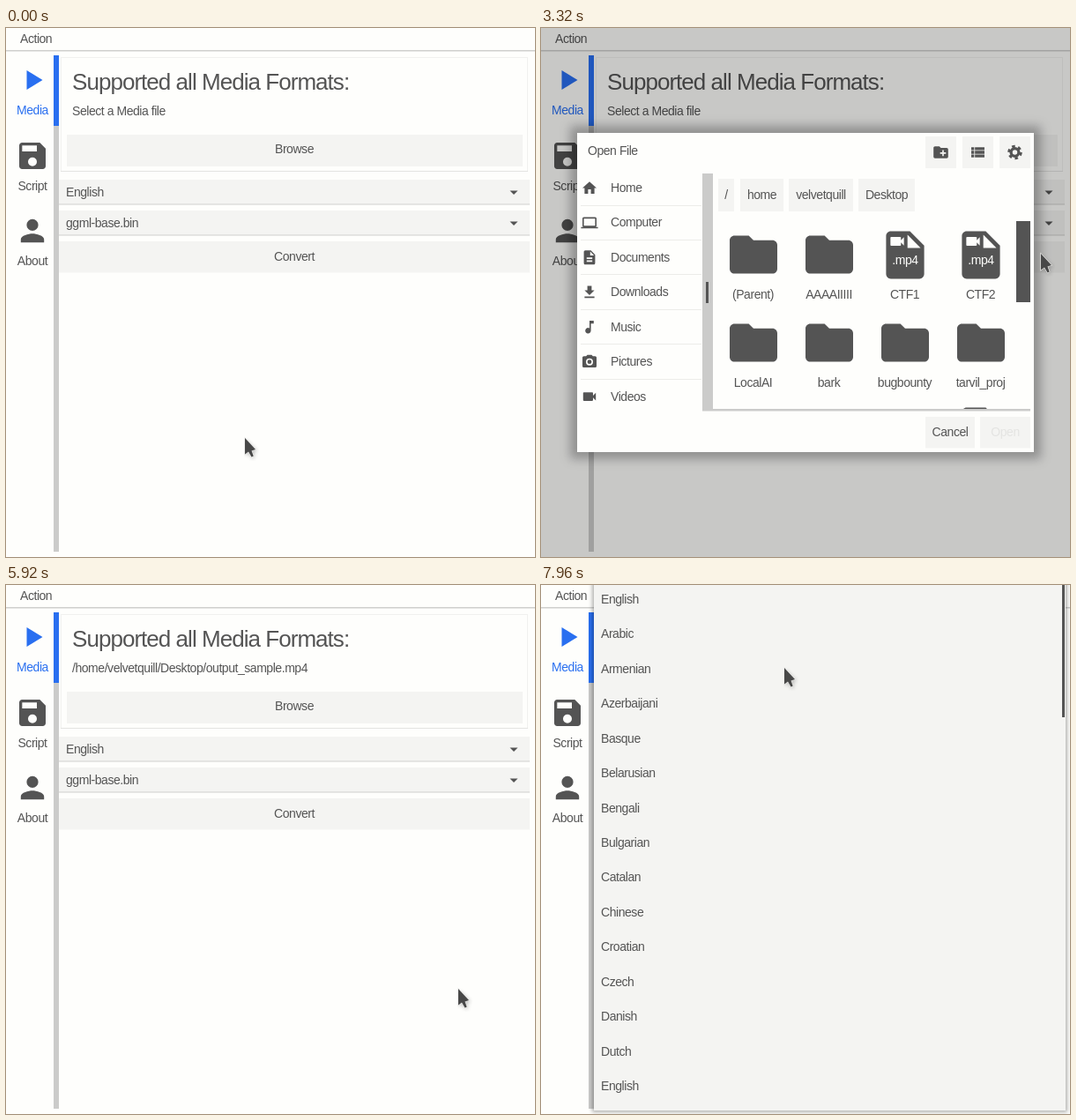
Write an HTML page that moves like this. It is 600 by 600 pixels and loops after 8000 ms.

```html
<!DOCTYPE html>
<html lang="en">
<head>
<meta charset="utf-8">
<title>Media converter</title>
<style>
  :root {
    --page: #fefefc; --control: #f4f4f2; --ink: #545454; --bar: #cbcbca;
    --rule: #cfcfce; --blue: #296ff0; --pick: #c8dbfa;
  }
  html, body { margin: 0; width: 100%; height: 100%; overflow: hidden; background: var(--page); }
  svg { display: block; width: 100vw; height: 100vh; }
  text { font: 14px "Liberation Sans", Arial, sans-serif; letter-spacing: -.45px; fill: var(--ink); white-space: pre; }
  .title { font-size: 26px; letter-spacing: -.96px; }
  .mid { text-anchor: middle; }
  .ink { fill: var(--ink); }
  .control { fill: var(--control); }
  .page, text.page { fill: var(--page); }
  .blue, text.blue { fill: var(--blue); }
  .bar { fill: var(--bar); }
  .rule { fill: var(--rule); }
  .faint, text.faint { fill: #e4e4e2; }
  .pick { fill: var(--pick); }
  .hover { fill: #000; fill-opacity: .05; }
  .ripple { fill: #000; fill-opacity: .09; transform-box: fill-box; transform-origin: center; }

  #cursor, #scroll, #thumb, .ripple { animation: 8s linear infinite; }
  #cursor { animation-name: cursor; animation-timing-function: ease-in-out; }
  #scroll { animation-name: scroll; animation-timing-function: ease-in-out; }
  #thumb { animation-name: thumb; animation-timing-function: ease-in-out; }
  #browseRipple { animation-name: browseRipple; }
  #languageRipple { animation-name: languageRipple; }

  @keyframes cursor {
    0%, 1% { transform: translate(271px, 465px); }
    10.5% { transform: translate(245px, 175px); }
    14%, 27% { transform: translate(237px, 133px); }
    32%, 34.5% { transform: translate(412px, 262px); }
    40.5%, 42% { transform: translate(567px, 256px); }
    45%, 45.5% { transform: translate(548px, 310px); }
    51%, 51.5% { transform: translate(552px, 420px); }
    59%, 61% { transform: translate(444px, 323px); }
    63.5%, 66% { transform: translate(420px, 318px); }
    72%, 75% { transform: translate(513px, 458px); }
    90%, 94.5% { transform: translate(274px, 183px); }
    99%, 100% { transform: translate(276px, 94px); }
  }
  @keyframes scroll {
    0%, 45.5% { transform: none; }
    51%, 100% { transform: translateY(-246px); }
  }
  @keyframes thumb {
    0%, 45.5% { transform: none; }
    51%, 100% { transform: translateY(105px); }
  }
  @keyframes browseRipple {
    0%, 22.5% { transform: scaleX(0); animation-timing-function: ease-out; }
    25%, 26.5% { transform: scaleX(1); }
    26.51%, 100% { transform: scaleX(0); }
  }
  @keyframes languageRipple {
    0%, 92% { transform: scaleX(0); animation-timing-function: ease-out; }
    95.5% { transform: scaleX(1); }
    95.6%, 100% { transform: scaleX(0); }
  }
</style>
</head>
<body>
<svg viewBox="0 0 600 600">
  <defs>
    <path id="folder" d="M10 4H4C2.9 4 2 4.9 2 6v12c0 1.1.9 2 2 2h16c1.1 0 2-.9 2-2V8c0-1.1-.9-2-2-2h-8z"/>
    <path id="camera" d="M17 10.5V7c0-.6-.4-1-1-1H4c-.6 0-1 .4-1 1v10c0 .6.4 1 1 1h12c.6 0 1-.4 1-1v-3.500l4 4v-11z"/>
    <path id="sheet" d="M14 2H6C4.900 2 4 2.900 4 4v16c0 1.100.9 2 2 2h12c1.100 0 2-.9 2-2V8zM13 9V3.500L18.500 9z"/>
    <path id="home" d="M10 20v-6h4v6h5v-8h3L12 3 2 12h3v8z"/>
    <path id="computer" d="M20 18c1.100 0 2-.9 2-2V6c0-1.100-.9-2-2-2H4c-1.100 0-2 .9-2 2v10c0 1.100.9 2 2 2H0v2h24v-2zM4 6h16v10H4z" fill-rule="evenodd"/>
    <path id="document" d="M14 2H6C4.900 2 4 2.900 4 4v16c0 1.100.9 2 2 2h12c1.100 0 2-.9 2-2V8zM16 18H8v-2h8zM16 14H8v-2h8zM13 9V3.500L18.500 9z" fill-rule="evenodd"/>
    <path id="download" d="M19 9h-4V3H9v6H5l7 7zM5 18v2h14v-2z"/>
    <path id="music" d="M12 3v10.600A4 4 0 1 0 14 17V7h4V3z"/>
    <path id="photo" d="M9 2L7.200 4H4C2.900 4 2 4.900 2 6v12c0 1.100.9 2 2 2h16c1.100 0 2-.9 2-2V6c0-1.100-.9-2-2-2h-3.200L15 2zM12 7a5 5 0 1 1 0 10a5 5 0 0 1 0-10zM12 9a3 3 0 1 0 0 6a3 3 0 0 0 0-6z" fill-rule="evenodd"/>
    <path id="newFolder" d="M20 6h-8l-2-2H4C2.900 4 2 4.900 2 6v12c0 1.100.9 2 2 2h16c1.100 0 2-.9 2-2V8c0-1.100-.9-2-2-2zM19 14h-3v3h-2v-3h-3v-2h3V9h2v3h3z" fill-rule="evenodd"/>
    <path id="list" d="M3 5h4v4H3zM3 10h4v4H3zM3 15h4v4H3zM8 5h13v4H8zM8 10h13v4H8zM8 15h13v4H8z"/>
    <g id="gear" fill="none" stroke="#545454">
      <circle cx="12" cy="12" r="5.300" fill="none" stroke-width="4"/>
      <circle cx="12" cy="12" r="8.200" fill="none" stroke-width="3.500" stroke-dasharray="4.300 4.287"/>
    </g>
    <path id="save" d="M17 3H5c-1.100 0-2 .9-2 2v14c0 1.100.9 2 2 2h14c1.100 0 2-.9 2-2V7zM12 19a3 3 0 1 1 0-6a3 3 0 0 1 0 6zM15 9H5V5h10z" fill-rule="evenodd"/>
    <path id="person" d="M12 12a4 4 0 1 0 0-8a4 4 0 0 0 0 8zM12 14c-2.700 0-8 1.300-8 4v2h16v-2c0-2.700-5.300-4-8-4z"/>
    <filter id="blur" x="-20%" y="-20%" width="140%" height="140%"><feGaussianBlur stdDeviation="6"/></filter>
    <filter id="softBlur"><feGaussianBlur stdDeviation="2"/></filter>
    <linearGradient id="fade" x2="0" y2="1">
      <stop stop-opacity=".3"/><stop offset="1" stop-opacity="0"/>
    </linearGradient>
    <clipPath id="view"><path d="M195 219h361v213H195z"/></clipPath>
  </defs>
  <g id="main"></g>
  <g id="dialog"></g>
  <g id="languages"></g>
  <g id="cursor">
    <path d="M1 2V20L5 17 8 23 11 22 9 16 14 15Z" fill="#555" opacity=".4" filter="url(#softBlur)"/>
    <path d="M0 0V18.500L4 15.500 7.500 21.500 9.700 20.500 7.500 14.500 12 13Z" fill="#484848" stroke="#ececea" stroke-width="1.200" paint-order="stroke"/>
  </g>
</svg>
<script>
const LOOP = 8000;
const byId = id => document.getElementById(id);
const rect = (x, y, w, h, cls, extra = '') =>
  `<rect x="${x}" y="${y}" width="${w}" height="${h}" class="${cls}" ${extra}/>`;
// y is the middle of the capitals
const label = (s, x, y, cls = '') => `<text x="${x}" y="${y + 5}" class="${cls}">${s}</text>`;
const icon = (id, cx, cy, scale, cls = 'ink') =>
  `<use href="#${id}" class="${cls}" transform="translate(${cx} ${cy}) scale(${scale}) translate(-12 -12)"/>`;
const button = (s, x, y, w, h, cls = 'control', textCls = '') =>
  rect(x, y, w, h, cls) + label(s, x + w / 2, y + h / 2 - .5, 'mid ' + textCls);
const group = (id, body) => `<g id="${id}">${body}</g>`;
const select = (s, y, overlay = '') =>
  rect(60, y, 534, 28, 'control') + overlay + rect(60, y + 27.500, 534, 1, 'rule') + label(s, 68, y + 13.500) +
  `<path class="ink" d="M571.500 ${y + 12.500}h9l-4.500 4.500z"/>`;

byId('main').innerHTML =
  label('Action', 16, 12) + rect(0, 25, 600, 1.500, 'rule') +
  rect(54, 31, 6, 563, 'bar') + rect(54, 31, 6, 80, 'blue') +
  '<path class="blue" d="M23.500 48L41.500 59 23.500 70z"/>' + label('Media', 30, 93, 'mid blue') +
  icon('save', 30, 145, 1.667) + label('Script', 30, 179, 'mid') +
  icon('person', 30, 230, 1.650) + label('About', 30, 264, 'mid') +
  rect(62.500, 33.500, 529, 129, '', 'fill="none" stroke="#f1f1ef"') + rect(62, 162, 530, 1, 'faint') +
  '<text x="75" y="70" class="title">Supported all Media Formats:</text>' +
  group('noFile', label('Select a Media file', 75, 94)) +
  group('chosenFile', label('/home/velvetquill/Desktop/output_sample.mp4', 75, 94)) +
  rect(69, 121, 517, 36, 'control') + rect(69, 121, 517, 36, 'hover', 'id="browseHover"') +
  rect(69, 121, 517, 36, 'ripple', 'id="browseRipple"') + label('Browse', 327, 137, 'mid') +
  select('English', 172, rect(60, 172, 534, 28, 'hover', 'id="languageHover"') +
    rect(60, 172, 534, 28, 'ripple', 'id="languageRipple"')) +
  select('ggml-base.bin', 207) +
  button('Convert', 60, 242, 534, 35.500);

const column = i => 241 + 86 * (i % 4);
const row = i => 100 * Math.floor(i / 4);
const isVideo = name => /^(CTF|lv_|output)/.test(name);
const entry = (name, i) => {
  const x = column(i), y = row(i);
  const art = isVideo(name)
    ? icon('sheet', x, 257.500 + y, 2.700) + icon('camera', x - 9, 242 + y, .85, 'page') +
      label('.mp4', x, 263 + y, 'mid page')
    : icon('folder', x, 257 + y, 2.700);
  return art + label(name, x - .5, 302 + y, 'mid');
};
const homeFiles = ['(Parent)', 'Android', 'Desktop', 'Document', 'Download', 'IdeaProjec', 'Music', 'Pictures'];
const desktopFiles = ['(Parent)', 'AAAAIIIII', 'CTF1', 'CTF2', 'LocalAI', 'bark', 'bugbounty', 'tarvil_proj',
  'golearn', 'golearnYT', 'lab', 'lv_0_2023', 'output', 'output', 'output_sa', 'pico', 'projects', 'scripts', 'tools'];
const places = [['Home', 'home'], ['Computer', 'computer'], ['Documents', 'document'], ['Downloads', 'download'],
  ['Music', 'music'], ['Pictures', 'photo'], ['Videos', 'camera']];

byId('dialog').innerHTML =
  rect(0, 0, 600, 600, '', 'fill-opacity=".21"') +
  rect(33, 111, 534, 378, '', 'fill-opacity=".28" filter="url(#blur)"') +
  rect(41, 119, 518, 362, 'page') + label('Open File', 53, 139) +
  ['newFolder', 'list', 'gear'].map((id, i) =>
    rect(436 + 42 * i, 123, 35, 36, 'control') + icon(id, 453.500 + 42 * i, 141, .83)).join('') +
  rect(45, 165, 137, 33, 'pick', 'id="homePick"') +
  places.map(([name, id], i) => {
    const y = 181 + 39.430 * i;
    return icon(id, 55, y + .5, .8) + label(name, 79, y) +
      (i < 6 ? rect(45, Math.round(y + 19.500), 137, 1, 'faint', 'opacity=".7"') : '');
  }).join('') +
  rect(183, 165, 12, 269, 'bar') + rect(187, 288, 3, 24, 'ink') +
  button('/', 201, 171, 18, 37) + button('home', 226, 171, 49, 37) + button('velvetquill', 281, 171, 73, 37) +
  group('homeView',
    `<g clip-path="url(#view)">${homeFiles.map(entry).join('')}</g>` + rect(552, 219, 3, 77, 'ink')) +
  group('desktopView',
    button('Desktop', 360, 171, 64, 37) +
    `<g clip-path="url(#view)"><g id="scroll">` +
      rect(370, 519, 86, 97, 'pick', 'id="filePick"') + desktopFiles.map(entry).join('') + '</g></g>' +
    group('thumb', rect(552, 219, 3, 92, 'ink') + rect(539, 219, 16, 92, 'ink', 'id="wideThumb"')) +
    group('topShade', rect(195, 218, 360, 5, '', 'fill="url(#fade)"'))) +
  rect(183, 432, 372, 2.500, 'bar') +
  button('Cancel', 436, 441, 56, 35.500) + button('Open', 498, 441, 57, 35.500, 'control', 'faint') +
  group('ready', label('output_sample.mp4', 53, 458) + button('Open', 498, 441, 57, 35.500, 'blue', 'page'));

const languages = ['English', 'Arabic', 'Armenian', 'Azerbaijani', 'Basque', 'Belarusian', 'Bengali', 'Bulgarian',
  'Catalan', 'Chinese', 'Croatian', 'Czech', 'Danish', 'Dutch', 'English'];
byId('languages').innerHTML =
  rect(58, -4, 539, 602, '', 'fill-opacity=".3" filter="url(#softBlur)"') +
  rect(60, -1, 535, 597, 'control') +
  languages.map((name, i) => label(name, 68, 16 + 39.430 * i)).join('') +
  rect(591, 0, 3, 150, 'ink');

// Shows an element only inside the given time spans (ms)
const sheet = document.styleSheets[0];
function during(id, ...spans) {
  const at = t => (t / LOOP * 100).toFixed(3) + '%';
  const steps = spans.map(([from, to]) => `${at(from)}{opacity:1}` + (to < LOOP ? `${at(to)}{opacity:0}` : '')).join('');
  const start = spans[0][0] > 0 ? '0%{opacity:0}' : '';
  sheet.insertRule(`@keyframes ${id}Shown{${start}${steps}}`, sheet.cssRules.length);
  byId(id).style.animation = `${id}Shown 8s step-end infinite`;
}
during('dialog', [1920, 5916]);
during('noFile', [0, 5916]);
during('chosenFile', [5916, LOOP]);
during('homePick', [1920, 2680]);
during('homeView', [1920, 2680]);
during('desktopView', [2680, 5916]);
during('wideThumb', [3160, 4200]);
during('topShade', [3680, 5916]);
during('filePick', [5160, 5916]);
during('ready', [5160, 5916]);
during('browseHover', [960, 2120]);
during('languageHover', [700, 900], [7200, 7440]);
during('languages', [7440, LOOP]);
</script>
</body>
</html>
```
